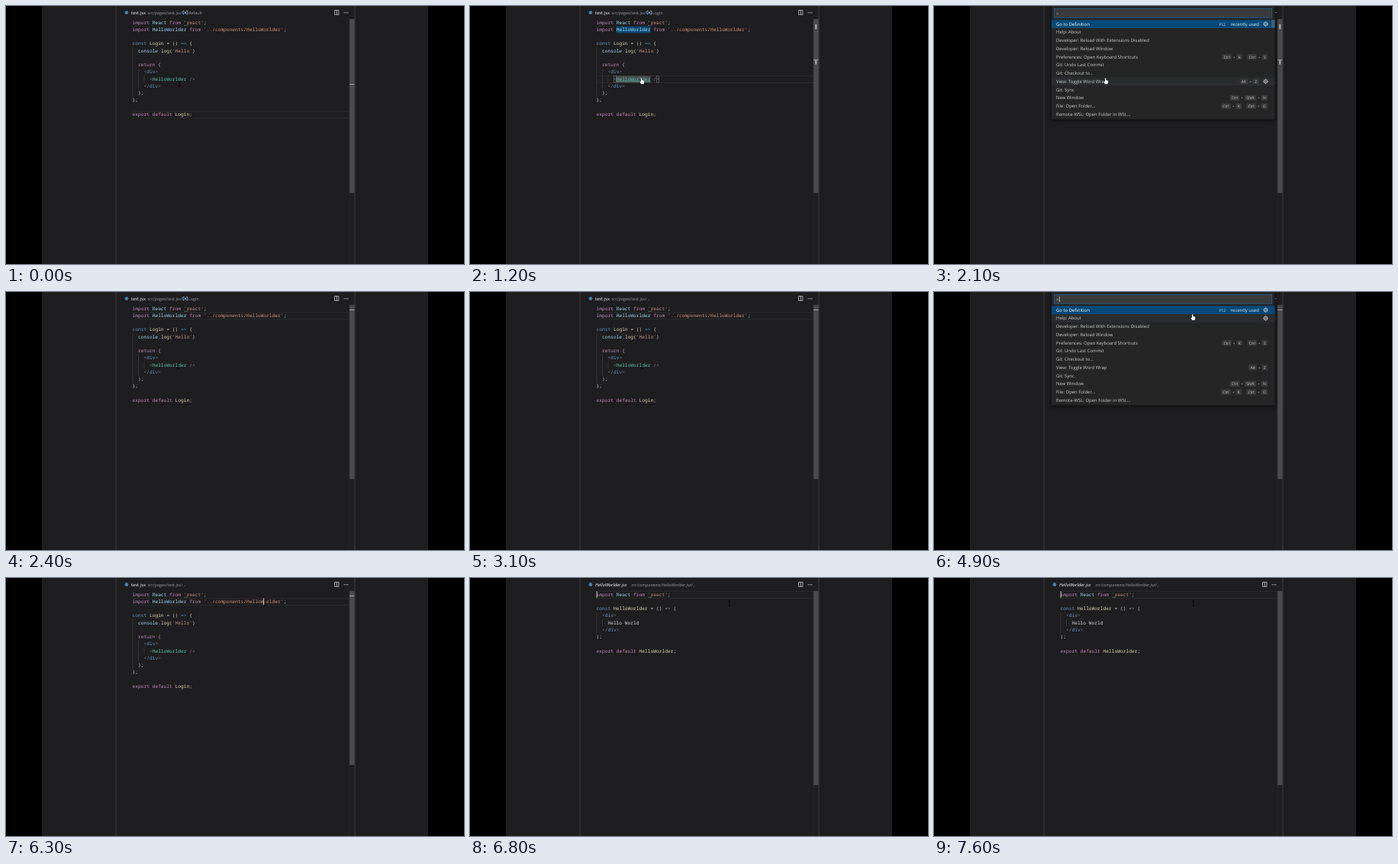
These frames come from a looping animation (600 by 338 pixels, 7.8 s). An HTML page with a canvas:

```html
<!DOCTYPE html>
<html lang="en">
<head>
<meta charset="utf-8">
<title>Go to Definition</title>
<style>
  html, body { margin: 0; width: 100%; height: 100%; overflow: hidden; background: #000; }
  canvas { display: block; width: 600px; height: 338px; }
</style>
</head>
<body>
<canvas id="stage" width="600" height="338"></canvas>
<script>
const ctx = document.getElementById('stage').getContext('2d');
ctx.textRendering = 'geometricPrecision';

const LOOP = 7800;
const CLICK_TAG = 400, MARK_WORDS = 700, CTRL_TAG = 1100;
const OPEN_1 = 1500, CLOSE_1 = 2300, CRUMB_SHORT = 2500;
const MOVE_START = 3300, MOVE_END = 4000, CLICK_PATH = 4400;
const OPEN_2 = 4900, CLOSE_2 = 6300, OPEN_FILE = 6800;

const UI = '"Open Sans", "Noto Sans", sans-serif';
const CODE_FONT = '6.23px "Noto Sans Mono", monospace';
const LEFT = 165.5, CHAR = 3.74, LINE = 9.26, TOP = 17;

// First letter of each token picks its colour.
const COLORS = {
  p: '#c586c0', v: '#9cdcfe', s: '#ce9178', b: '#569cd6',
  f: '#dcdcaa', t: '#4ec9b0', g: '#808080', w: '#d4d4d4'
};

const PAGE = [
  "pimport |vReact |pfrom |s'react'|w;",
  "pimport |vHelloWorlder |pfrom |s'../components/HelloWorlder'|w;",
  "",
  "bconst |fLogin |w= () |b=> |w{",
  "w  |vconsole|w.|flog|w(|s'Hello'|w)",
  "",
  "w  |preturn |w(",
  "w    |g<|bdiv|g>",
  "w      |g<|tHelloWorlder |g/>",
  "w    |g</|bdiv|g>",
  "w  );",
  "w};",
  "",
  "pexport |pdefault |fLogin|w;"
];

const COMPONENT = [
  "pimport |vReact |pfrom |s'react'|w;",
  "",
  "bconst |fHelloWorlder |w= () |b=> |w(",
  "w  |g<|bdiv|g>",
  "w    Hello World",
  "w  |g</|bdiv|g>",
  "w);",
  "",
  "pexport |pdefault |fHelloWorlder|w;"
];

const COMMANDS = [
  ['Go to Definition'],
  ['Help: About'],
  ['Developer: Reload With Extensions Disabled'],
  ['Developer: Reload Window'],
  ['Preferences: Open Keyboard Shortcuts', 'Ctrl+K Ctrl+S'],
  ['Git: Undo Last Commit'],
  ['Git: Checkout to...'],
  ['View: Toggle Word Wrap', 'Alt+Z'],
  ['Git: Sync'],
  ['New Window', 'Ctrl+Shift+N'],
  ['File: Open Folder...', 'Ctrl+K Ctrl+O'],
  ['Remote-WSL: Open Folder in WSL...']
];

const between = (t, a, b) => t >= a && t < b;
const blink = (t, start) => Math.floor((t - start) / 500) % 2 === 0;
const colX = col => LEFT + col * CHAR;
const lineY = row => TOP + row * LINE;

function rect(x, y, w, h, color) {
  ctx.fillStyle = color;
  ctx.fillRect(x, y, w, h);
}

function frame(x, y, w, h, color, width = 0.6) {
  ctx.strokeStyle = color;
  ctx.lineWidth = width;
  ctx.strokeRect(x, y, w, h);
}

function text(str, x, y, color, size = 5.95, style = '', align = 'left') {
  ctx.font = `${style} ${size}px ${UI}`;
  ctx.textAlign = align;
  ctx.fillStyle = color;
  ctx.fillText(str, x, y);
  return ctx.measureText(str).width;
}

function drawCode(lines) {
  ctx.font = CODE_FONT;
  ctx.textAlign = 'left';
  lines.forEach((line, row) => {
    let col = 0;
    for (const token of line.split('|')) {
      ctx.fillStyle = COLORS[token[0]] || COLORS.w;
      ctx.fillText(token.slice(1), colX(col), lineY(row) + 6.6);
      col += Math.max(token.length - 1, 0);
    }
  });
  for (let i = 0; i < 3; i++) rect(233.6 + i * 1.9, 24.8, 0.9, 0.9, '#a0a0a0');
}

function guide(col, from, to) {
  rect(colX(col) + 0.2, lineY(from), 0.6, (to - from) * LINE, '#464547');
}

function caret(x, row) {
  rect(x - 0.4, lineY(row) + 0.1, 1, LINE - 0.2, '#c8c8c8');
}

function currentLine(row) {
  const y = lineY(row) + 0.2;
  rect(LEFT, y, 284.5, 0.8, '#2f2e30');
  rect(LEFT, y + LINE - 0.4, 284.5, 0.8, '#2f2e30');
}

function drawShell() {
  rect(0, 0, 600, 338, '#000');
  rect(47, 0, 506, 338, '#1e1d1f');
  rect(143.5, 0, 1, 338, '#3b3a3c');
  rect(456.5, 0, 1, 338, '#3b3a3c');
  rect(449.6, 17, 0.7, 321, '#2b2a2c');
  frame(430.5, 5.6, 5.4, 5.6, '#c5c5c5', 0.8);
  rect(432.9, 5.6, 0.8, 5.6, '#c5c5c5');
  for (let i = 0; i < 3; i++) rect(442.6 + i * 2.3, 8.1, 1.2, 1.2, '#c5c5c5');
}

function drawHeader(t) {
  ctx.fillStyle = '#3c86b0';
  ctx.beginPath();
  ctx.arc(158, 8.6, 2.4, 0, Math.PI * 2);
  ctx.fill();
  const grey = '#9d9d9d';
  if (t >= OPEN_FILE) {
    text('HelloWorlder.jsx', 164, 10.8, '#fff', 5.82, 'italic');
    text('src/components/HelloWorlder.jsx/...', 211.5, 10.8, grey, 5.4, 'italic');
    return;
  }
  text('test.jsx', 164, 10.8, '#fff', 5.82);
  const end = 185.5 + text('src/pages/test.jsx/', 185.5, 10.8, grey, 5.4);
  if (t >= CRUMB_SHORT) {
    text('...', end, 10.8, grey, 5.4);
    return;
  }
  const blue = '#75beff';
  rect(end + 0.6, 6.3, 0.8, 4.8, blue);
  rect(end + 0.6, 6.3, 1.8, 0.7, blue);
  rect(end + 0.6, 10.4, 1.8, 0.7, blue);
  rect(end + 6, 6.3, 0.8, 4.8, blue);
  rect(end + 5, 6.3, 1.8, 0.7, blue);
  rect(end + 5, 10.4, 1.8, 0.7, blue);
  rect(end + 2.7, 7.6, 2.1, 2.1, blue);
  text(t < CLICK_TAG ? 'default' : 'Login', end + 7.9, 10.8, grey, 5.4);
}

function drawRuler(t) {
  rect(450, 17, 6.6, t < OPEN_FILE ? 228 : 254.5, '#4b4a4c');
  if (t >= OPEN_FILE) return;
  const mark = t < CLICK_TAG ? 102 : t < CLOSE_1 ? 70 : 23;
  rect(450, mark, 6.4, 1, '#a5a5a5');
  if (between(t, MARK_WORDS, CLOSE_1)) {
    rect(452, 24, 2.4, 6.5, '#a0a0a0');
    rect(452, 70, 2.4, 6.5, '#a0a0a0');
  }
}

function drawPage(t) {
  currentLine(t < CLICK_TAG ? 13 : t < CLOSE_1 ? 8 : 1);
  guide(0, 4, 11);
  guide(2, 7, 10);
  guide(4, 8, 9);
  if (between(t, MARK_WORDS, CLOSE_1)) {
    rect(colX(7), lineY(1) + 0.4, 12 * CHAR, LINE - 0.4, '#0b4870');
    rect(colX(7), lineY(8) + 0.4, 12 * CHAR, LINE - 0.4, '#4a4a4c');
    frame(colX(6) + 0.3, lineY(8) + 0.7, CHAR - 0.6, LINE - 1, '#777');
    frame(colX(21) + 0.3, lineY(8) + 0.7, CHAR - 0.6, LINE - 1, '#777');
  }
  drawCode(PAGE);
  if (between(t, CTRL_TAG, OPEN_1)) rect(colX(7), lineY(8) + 7.6, 12 * CHAR, 0.6, COLORS.t);
  if (between(t, CLICK_PATH + 100, OPEN_2)) rect(colX(26), lineY(1) + 7.6, 26 * CHAR, 0.6, COLORS.s);

  if (between(t, CLICK_TAG, OPEN_1)) {
    if (blink(t, CLICK_TAG)) caret(colX(16), 8);
  } else if (between(t, CLOSE_1, CLICK_PATH)) {
    if (blink(t, CLOSE_1 + 200)) caret(colX(7), 1);
  } else if (t >= CLICK_PATH && blink(t, t < CLOSE_2 ? CLICK_PATH : CLOSE_2)) {
    caret(colX(46), 1);
  }
}

function drawComponent(t) {
  currentLine(0);
  guide(0, 3, 6);
  guide(2, 4, 5);
  drawCode(COMPONENT);
  if (blink(t, 6600)) caret(colX(0) + 0.5, 0);
}

function gear(x, y) {
  ctx.strokeStyle = '#c5c5c5';
  ctx.lineWidth = 0.8;
  ctx.beginPath();
  ctx.arc(x, y, 2.3, 0, Math.PI * 2);
  ctx.moveTo(x + 0.9, y);
  ctx.arc(x, y, 0.9, 0, Math.PI * 2);
  for (let i = 0; i < 8; i++) {
    const c = Math.cos(i * Math.PI / 4), s = Math.sin(i * Math.PI / 4);
    ctx.moveTo(x + c * 2.3, y + s * 2.3);
    ctx.lineTo(x + c * 3.4, y + s * 3.4);
  }
  ctx.stroke();
}

// Lays key chips out from the right edge leftwards.
function drawKeys(keys, right, y) {
  let x = right;
  for (const chord of keys.split(' ').reverse()) {
    chord.split('+').reverse().forEach((key, i) => {
      if (i) {
        text('+', x - 3.3, y + 1.9, '#b5b5b5', 5, '', 'center');
        x -= 6.6;
      }
      ctx.font = `5px ${UI}`;
      const w = ctx.measureText(key).width + 4.6;
      x -= w;
      ctx.fillStyle = '#39393a';
      ctx.beginPath();
      ctx.roundRect(x, y - 3.7, w, 7.4, 1.2);
      ctx.fill();
      text(key, x + w / 2, y + 1.9, '#cccccc', 5, '', 'center');
    });
    x -= 6;
  }
}

function drawPalette(age, hover) {
  ctx.save();
  ctx.shadowColor = 'rgba(0,0,0,.65)';
  ctx.shadowBlur = 5;
  ctx.shadowOffsetY = 1;
  rect(154, -4, 292.5, 152.5, '#252526');
  ctx.restore();
  rect(157, 3, 286, 12.5, '#3b3b3c');
  frame(157.3, 3.3, 285.4, 11.8, '#17669c', 0.7);
  text('>', 160, 11.8, '#cccccc', 5.6);
  if (blink(age, 0)) rect(163.9, 5.6, 0.8, 7.6, '#c8c8c8');

  COMMANDS.forEach(([label, keys], row) => {
    const y = 23.65 + row * 10.74;
    const hovered = row === hover;
    if (row === 0) rect(154, y - 5.37, 292.5, 10.74, '#064a7a');
    else if (hovered) rect(154, y - 5.37, 292.5, 10.74, '#2a2d2e');
    text(label, 160, y + 2.1, row ? '#cccccc' : '#ffffff');
    if (row === 0) {
      text('F12', 377.6, y + 1.9, '#d8e2ea', 5, '', 'center');
      text('recently used', 388.8, y + 2.1, '#e4ecf2');
    }
    if (row === 0 || hovered) gear(434.5, y);
    if (keys) drawKeys(keys, hovered ? 425.3 : 437, y);
  });
  if (age >= 100) rect(442, 18.3, 4.5, 10, 'rgba(121,121,121,.5)');
}

function pointerAt(t) {
  if (t < MOVE_START) {
    const k = Math.min(t / 300, 1);
    return [227 - k * 1.5, 102 - k * 5];
  }
  const u = Math.min((t - MOVE_START) / (MOVE_END - MOVE_START), 1);
  const k = u * u * (3 - 2 * u);
  return [225.5 + 114 * k, 97 - 64 * k];
}

function drawHand(x, y) {
  ctx.save();
  ctx.translate(x, y);
  ctx.beginPath();
  ctx.moveTo(-1.6, -3.5);
  ctx.quadraticCurveTo(-0.9, -4.6, -0.2, -3.5);
  ctx.lineTo(-0.2, -1.2);
  ctx.lineTo(2.2, -0.6);
  ctx.quadraticCurveTo(3, -0.3, 2.8, 1);
  ctx.lineTo(2, 4);
  ctx.lineTo(-1.3, 4);
  ctx.lineTo(-3.2, 0.9);
  ctx.quadraticCurveTo(-2.7, -0.1, -1.6, 1);
  ctx.closePath();
  ctx.strokeStyle = '#111';
  ctx.lineWidth = 1;
  ctx.stroke();
  ctx.fillStyle = '#fff';
  ctx.fill();
  ctx.restore();
}

function drawBeam(x, y) {
  rect(x - 0.4, y - 3.2, 0.9, 6.6, '#050505');
  rect(x - 1.5, y - 3.5, 3.1, 0.7, '#09090a');
  rect(x - 1.5, y + 3.1, 3.1, 0.7, '#09090a');
}

function render(t) {
  drawShell();
  drawHeader(t);
  if (t < OPEN_FILE) drawPage(t);
  else drawComponent(t);
  drawRuler(t);
  if (between(t, OPEN_1, CLOSE_1)) drawPalette(t - OPEN_1, 7);
  if (between(t, OPEN_2, CLOSE_2)) drawPalette(t - OPEN_2, 1);

  const [x, y] = pointerAt(t);
  const hand = between(t, CTRL_TAG, CLOSE_1) || between(t, CLICK_PATH + 100, CLOSE_2);
  if (hand) drawHand(x, t < CLOSE_1 ? y + 1.3 : y);
  else drawBeam(x, y);
}

const start = performance.now();
function tick() {
  render((performance.now() - start) % LOOP);
  requestAnimationFrame(tick);
}
tick();
</script>
</body>
</html>
```
